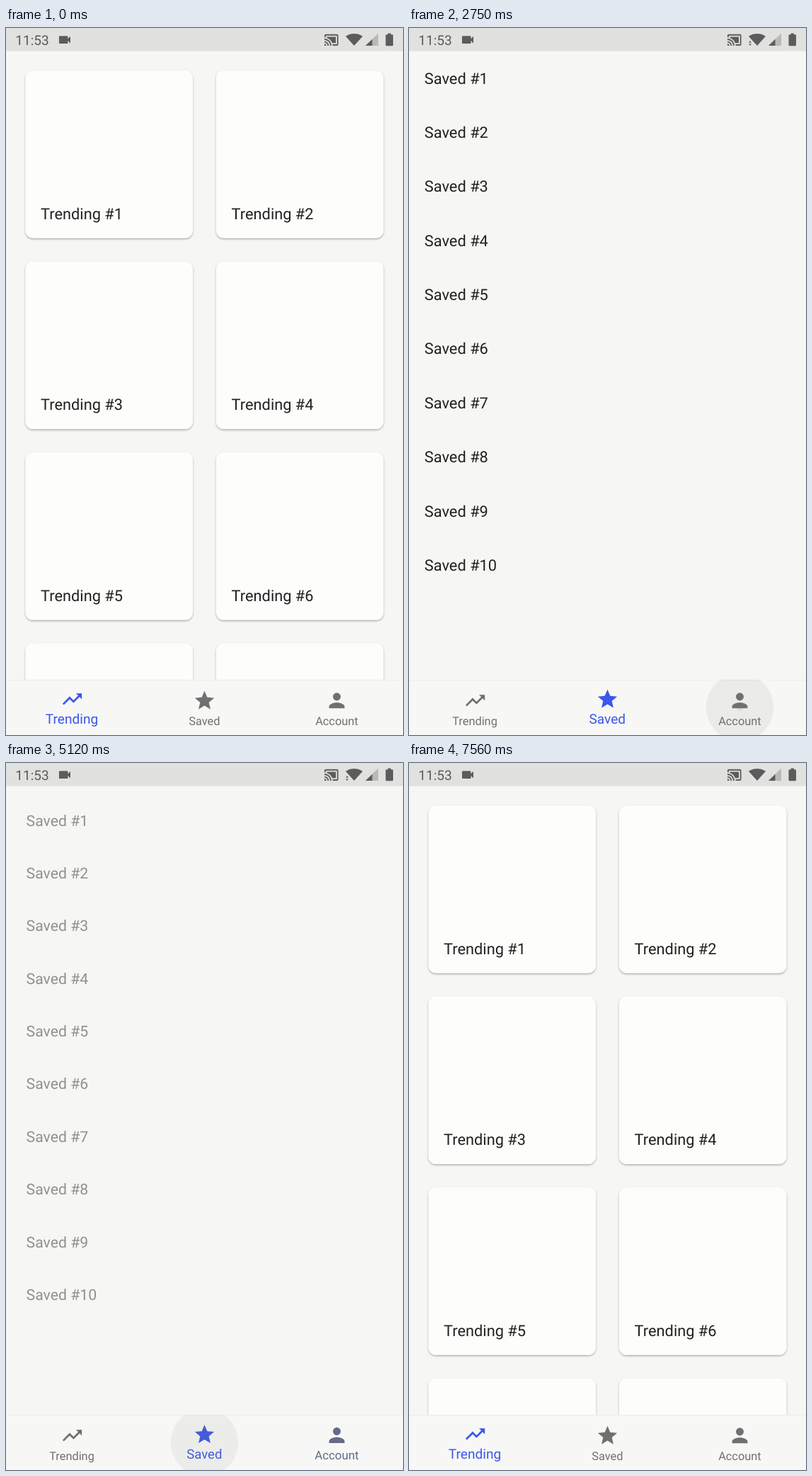
Write an HTML page with a canvas that moves like this. It is 561 by 998 pixels and loops after 8 s.

```html
<!DOCTYPE html>
<html lang="en">
<head>
<meta charset="utf-8">
<title>Tab switching</title>
<style>
  html, body { margin: 0; width: 100%; height: 100%; overflow: hidden; background: #f6f6f4; }
  canvas { display: block; width: 100vw; height: 100vh; }
</style>
</head>
<body>
<canvas id="stage" width="561" height="998"></canvas>
<script>
const W = 561, H = 998, BAR = 920, LOOP = 8000;
const DP = W / 411.43;
const FADE = 530, LABEL = 435;
const INK = 'rgba(0,0,0,.87)', STATUS_INK = '#5c5c5c';
const PAPER = '#f6f6f4', CARD = '#fdfdfb';
const IDLE = [112, 112, 113], ACTIVE = [58, 87, 238];

const stage = document.getElementById('stage');
const ctx = stage.getContext('2d');
const layer = document.createElement('canvas');
layer.width = W;
layer.height = H;
const page = layer.getContext('2d');

const icon = d => new Path2D(d);
const tabs = [
  { label: 'Trending', x: 93, iconX: 93.5, icon: icon('M16 6l2.29 2.29-4.88 4.88-4-4L2 16.59 3.41 18l6-6 4 4 6.3-6.29L22 12V6z') },
  { label: 'Saved', x: 280.3, iconX: 280.5, icon: icon('M12 17.27L18.18 21l-1.64-7.03L22 9.24l-7.19-.61L12 2 9.19 8.63 2 9.24l5.46 4.73L5.82 21z') },
  { label: 'Account', x: 467.4, iconX: 467.5, icon: icon('M12 12c2.21 0 4-1.79 4-4s-1.79-4-4-4-4 1.79-4 4 1.79 4 4 4zm0 2c-2.67 0-8 1.34-8 4v2h16v-2c0-2.66-5.33-4-8-4z') }
];
const camera = icon('M17 10.5V7c0-.55-.45-1-1-1H4c-.55 0-1 .45-1 1v10c0 .55.45 1 1 1h12c.55 0 1-.45 1-1v-3.5l4 4v-11l-4 4z');
const cast = icon('M1 18v3h3c0-1.66-1.34-3-3-3zm0-4v2c2.76 0 5 2.24 5 5h2c0-3.87-3.13-7-7-7zm18-7H5v1.63c3.96 1.28 7.09 4.41 8.37 8.37H19V7zM1 10v2c4.97 0 9 4.03 9 9h2c0-6.08-4.93-11-11-11zm20-7H3c-1.1 0-2 .9-2 2v3h2V5h18v14h-7v2h7c1.1 0 2-.9 2-2V5c0-1.1-.9-2-2-2z');
const wifi = icon('M12 21.5L23.64 7c-.45-.34-4.93-4-11.64-4S.81 6.66.36 7z');

// Finger down, finger up, and the tabs left and entered
const taps = [
  { down: 1140, up: 1367, from: 0, to: 1 },
  { down: 2470, up: 2761, from: 1, to: 2 },
  { down: 4640, up: 4893, from: 2, to: 1 },
  { down: 6750, up: 6995, from: 1, to: 0 }
];

const clamp = v => Math.min(1, Math.max(0, v));
const mix = (a, b, p) => a + (b - a) * p;

function bezier(x1, y1, x2, y2) {
  const at = (a, b, s) => 3 * a * s * (1 - s) ** 2 + 3 * b * s * s * (1 - s) + s ** 3;
  return x => {
    if (x <= 0 || x >= 1) return clamp(x);
    let lo = 0, hi = 1;
    for (let i = 0; i < 24; i++) {
      const mid = (lo + hi) / 2;
      if (at(x1, x2, mid) < x) lo = mid; else hi = mid;
    }
    return at(y1, y2, lo);
  };
}
const standard = bezier(.4, 0, .2, 1);
const accelerate = bezier(.4, 0, 1, 1);
const decelerate = bezier(0, 0, .2, 1);

function text(g, str, x, y, size, color, align = 'left', weight = 400) {
  g.font = `${weight} ${size}px Roboto, sans-serif`;
  g.textRendering = 'geometricPrecision';
  g.textAlign = align;
  g.fillStyle = color;
  g.fillText(str, x, y);
}

function shape(g, path, x, y, sx, sy, color) {
  g.save();
  g.translate(x, y);
  g.scale(sx, sy);
  g.fillStyle = color;
  g.fill(path);
  g.restore();
}

function disc(g, x, y, r, color) {
  g.fillStyle = color;
  g.beginPath();
  g.arc(x, y, r, 0, Math.PI * 2);
  g.fill();
}

function polygon(g, color, ...points) {
  g.fillStyle = color;
  g.beginPath();
  points.forEach(([x, y]) => g.lineTo(x, y));
  g.fill();
}

function raised(g, x, y, w, h, r, drop, blur, alpha) {
  g.save();
  g.shadowColor = `rgba(0,0,0,${alpha})`;
  g.shadowOffsetY = drop;
  g.shadowBlur = blur;
  g.fillStyle = CARD;
  g.beginPath();
  g.roundRect(x, y, w, h, r);
  g.fill();
  g.restore();
}

function drawTrending(g) {
  const size = 236.8, pitch = size + 24 * DP;
  for (let i = 0; i < 8; i++) {
    const x = 20 * DP + (i % 2) * pitch;
    const y = 44 * DP + Math.floor(i / 2) * pitch;
    raised(g, x, y, size, size, 8 * DP, 1.4, 2.6, .3);
    text(g, `Trending #${i + 1}`, x + 16 * DP, y + size - 27, 16 * DP, INK);
  }
}

function drawSaved(g) {
  for (let i = 0; i < 10; i++) {
    text(g, `Saved #${i + 1}`, 16 * DP, 78.7 + i * 56 * DP, 16 * DP, INK);
  }
}

function drawAccount(g) {
  raised(g, 0, 0, W, 469.5, 0, 4, 8, .36);
  const x = W / 2, y = 234.6, r = 56 * DP;
  const fill = g.createLinearGradient(x - r, y - r, x + r, y + r);
  fill.addColorStop(0, '#64ffda');
  fill.addColorStop(1, '#ff80ab');
  disc(g, x, y, r, fill);
  text(g, '@Pelug', 280.3, 440, 30 * DP, INK, 'center', 500);
}

const pages = [drawTrending, drawSaved, drawAccount];

function drawPage(index, alpha, scale) {
  if (alpha <= 0) return;
  page.clearRect(0, 0, W, H);
  page.save();
  page.translate(W / 2, BAR / 2);
  page.scale(scale, scale);
  page.translate(-W / 2, -BAR / 2);
  page.beginPath();
  page.rect(0, 0, W, BAR);
  page.clip();
  pages[index](page);
  page.restore();
  ctx.globalAlpha = alpha;
  ctx.drawImage(layer, 0, 0);
  ctx.globalAlpha = 1;
}

function drawStatus(t) {
  ctx.fillStyle = 'rgba(0,0,0,.085)';
  ctx.fillRect(0, 0, W, 24 * DP);
  text(ctx, '11:53', 13.3, 24, 14 * DP, STATUS_INK);
  shape(ctx, camera, 72.3, 6, .89, .89, STATUS_INK);
  shape(ctx, cast, 449.1, 6.2, .89, .89, STATUS_INK);
  shape(ctx, wifi, 479.6, 5.2, 1.03, .92, STATUS_INK);
  if (t >= 2010 && t < 5520) polygon(ctx, STATUS_INK, [480, 20.5], [482, 18], [484, 20.5]);
  if (t >= 1140 && t < 7540) polygon(ctx, STATUS_INK, [480, 22.5], [484, 22.5], [482, 25]);
  polygon(ctx, '#b9b9b9', [508, 25], [526, 25], [526, 7.5]);
  polygon(ctx, STATUS_INK, [508, 25], [517.5, 25], [517.5, 15.8]);
  ctx.fillStyle = STATUS_INK;
  ctx.fillRect(539.5, 7.5, 4.5, 3);
  ctx.beginPath();
  ctx.roundRect(536.5, 9.2, 10.5, 16, 1.2);
  ctx.fill();
}

function drawRipple(tap, t) {
  const held = Math.min(t, tap.up) - tap.down;
  const freed = Math.max(0, t - tap.up);
  const x = tabs[tap.to].iconX, y = 959, r = 35 * DP;
  const glow = .4 * clamp((held - freed) / FADE);
  const splash = .4 * clamp(1 - freed / FADE);
  const grow = clamp(held / (FADE * 5) + freed / 93);
  disc(ctx, x, y, r, `rgba(188,188,188,${glow})`);
  disc(ctx, x, y, r * grow, `rgba(200,200,200,${splash})`);
}

function drawBar(t, tap) {
  ctx.save();
  ctx.beginPath();
  ctx.rect(0, BAR, W, H - BAR);
  ctx.clip();
  ctx.fillStyle = '#f7f7f6';
  ctx.fillRect(0, BAR, W, H - BAR);
  ctx.fillStyle = '#ededf3';
  ctx.fillRect(0, BAR, W, 1);
  if (tap) drawRipple(tap, t);
  const p = tap ? standard(clamp((t - tap.up) / LABEL)) : 0;
  tabs.forEach((tab, i) => {
    const on = !tap ? +(i === 0) : i === tap.to ? p : i === tap.from ? 1 - p : 0;
    const color = `rgb(${IDLE.map((c, k) => Math.round(mix(c, ACTIVE[k], on)))})`;
    const half = 12 * DP;
    shape(ctx, tab.icon, tab.iconX - half, mix(949.4, 947.4, on) - half, DP, DP, color);
    text(ctx, tab.label, tab.x, mix(983.8, 982, on), mix(12, 14, on) * DP, color, 'center');
  });
  ctx.restore();
}

function draw(t) {
  const tap = taps.filter(k => t >= k.down).pop();
  const progress = tap ? clamp((t - tap.up) / FADE) : 1;
  ctx.fillStyle = PAPER;
  ctx.fillRect(0, 0, W, H);
  if (!tap) {
    drawPage(0, 1, 1);
  } else if (progress < .3) {
    drawPage(tap.from, 1 - accelerate(progress / .3), 1);
  } else {
    const shown = decelerate((progress - .3) / .7);
    drawPage(tap.to, shown, mix(.95, 1, shown));
  }
  drawBar(t, tap);
  drawStatus(t);
}

const begin = performance.now();
function tick() {
  draw((performance.now() - begin) % LOOP);
  requestAnimationFrame(tick);
}
tick();
</script>
</body>
</html>
```
